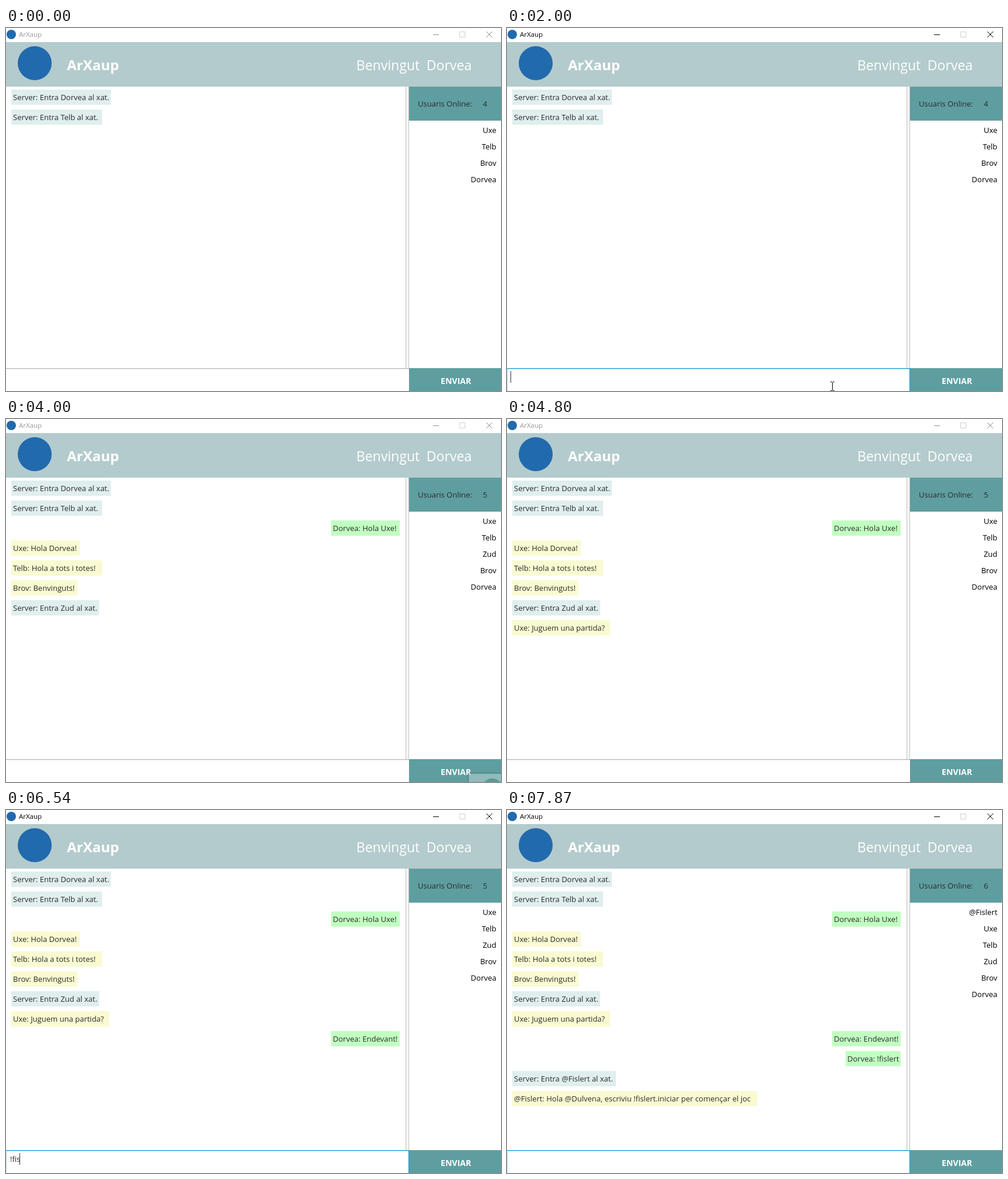
Write an HTML page that moves like this. It is 845x619 px and loops after 8000 ms.

```html
<!DOCTYPE html>
<html lang="ca">
<head>
<meta charset="utf-8">
<style>
html, body { margin: 0; width: 100%; height: 100%; overflow: hidden; background: #fff; }
#stage { position: relative; width: 845px; height: 619px; overflow: hidden; background: #fff;
  font: 13px/26px "Open Sans", "Noto Sans", sans-serif; color: #2b2b2b; white-space: nowrap; }
#stage div, #stage svg { position: absolute; box-sizing: border-box; }
#title { left: 22px; top: 0; font-size: 11.5px; line-height: 22px; color: #999; }
#buttons { left: 720px; top: 0; fill: none; stroke: #8f8f8f; }
.active #title { color: #000; }
.active #buttons { stroke: #000; }
.logo { border-radius: 50%; background: #216aae; }
#header { left: 0; top: 24px; width: 845px; height: 76px; background: #b4cbcd; color: #fff; line-height: 78px; }
#brand { left: 104px; top: 0; font-size: 24px; font-weight: bold; }
#hello { left: 598px; top: 0; font-size: 23px; }
#user { right: 50px; top: 0; font-size: 23px; }
#chat { left: 0; top: 100px; width: 682px; height: 480px; }
#divider { left: 682px; top: 100px; width: 6px; height: 480px; background: #f4f4f4;
  border: solid #c6c6c6; border-width: 0 1px; }
#online { left: 688px; top: 100px; width: 157px; height: 58px; padding-left: 15px; line-height: 58px; background: #5f9ea0; }
#count { left: 126px; top: 0; }
#users { right: 8px; top: 160px; line-height: 28px; text-align: right; white-space: pre; color: #000; }
.msg { height: 26px; padding-left: 3px; }
.server { background: #e0eeee; }
.other { background: #fafad2; }
.own { background: #c1ffc1; }
#field { left: 0; top: 580px; width: 688px; height: 40px; border-top: 1px solid #b9b9b9;
  box-shadow: inset 0 1px 1px #e6e6e6; }
.active #field { border: solid #1a9fd0; border-width: 1px 1px 0 0; box-shadow: inset 1px 1px 0 #a9dcf0; }
#input { left: 7px; top: 585px; height: 20px; line-height: 20px; white-space: pre; }
#caret { left: 100%; top: 0; width: 1px; height: 20px; margin-left: -1px; background: #333; }
#send { left: 688px; top: 580px; width: 157px; height: 39px; background: #5f9ea0; color: #fff;
  font-size: 14px; font-weight: bold; line-height: 43px; text-align: center; padding-left: 3px; }
#beam { left: 551px; top: 603px; fill: none; stroke: #000; }
#toast { left: 790px; top: 605px; width: 90px; height: 60px; background: #b4cbcd; box-shadow: 0 0 4px #0008; }
</style>
</head>
<body>
<div id="stage">
  <div class="logo" style="left:1px;top:3px;width:16px;height:16px"></div>
  <div id="title">ArXaup</div>
  <svg id="buttons" width="125" height="24">
    <path d="M9 11.5H19M100 6L110 16M110 6L100 16"/>
    <path d="M54.5 6.5h9v9h-9z" stroke="#d0d0d0"/>
  </svg>
  <div id="header">
    <div class="logo" style="left:20px;top:7px;width:58px;height:58px"></div>
    <div id="brand">ArXaup</div>
    <div id="hello">Benvingut</div>
    <div id="user">Dorvea</div>
  </div>
  <div id="chat"></div>
  <div id="divider"></div>
  <div id="online">Usuaris Online:<div id="count"></div></div>
  <div id="users"></div>
  <div id="field"></div>
  <div id="input"><span id="text"></span><div id="caret"></div></div>
  <div id="send">ENVIAR</div>
  <svg id="beam" width="9" height="16"><path d="M1 .5H3.5L4.5 1.5L5.5 .5H8M4.5 1V15M1 15.5H3.5L4.5 14.5L5.5 15.5H8"/></svg>
  <div id="toast"><div class="logo" style="left:22px;top:8px;width:36px;height:36px;background:#3ea58b"></div></div>
</div>
<script>
const LOOP = 8000;
const $ = id => document.getElementById(id);
const within = (t, from, to) => t >= from && t < to;

// time, kind, box width, text
const messages = [
  [0, 'server', 170, 'Server: Entra Dorvea al xat.'],
  [0, 'server', 155, 'Server: Entra Telb al xat.'],
  [2170, 'own', 117, 'Dorvea: Hola Uxe!'],
  [2480, 'other', 117, 'Uxe: Hola Dorvea!'],
  [2950, 'other', 155, 'Telb: Hola a tots i totes!'],
  [3260, 'other', 113, 'Brov: Benvinguts!'],
  [4000, 'server', 150, 'Server: Entra Zud al xat.'],
  [4800, 'other', 167, 'Uxe: Juguem una partida?'],
  [6070, 'own', 117, 'Dorvea: Endevant!'],
  [7560, 'own', 94, 'Dorvea: !fislert'],
  [7760, 'server', 177, 'Server: Entra @Fislert al xat.'],
  [7760, 'other', 418, '@Fislert: Hola @Dulvena, escriviu !fislert.iniciar per començar el joc']
].map(([time, kind, width, text], i) => {
  const el = document.createElement('div');
  el.className = 'msg ' + kind;
  el.textContent = text;
  el.style.cssText = `left:${kind === 'own' ? 672 - width : 9}px;top:${5 + 34 * i}px;width:${width}px`;
  $('chat').append(el);
  return { time, el };
});

const users = [[7760, '@Fislert'], [0, 'Uxe'], [0, 'Telb'], [4000, 'Zud'], [0, 'Brov'], [0, 'Dorvea']];

// Each run types its parts at even steps between two times, after the text before it.
const runs = [
  [368, 1160, '', [...'Hola U']],
  [1310, 1700, 'Hola U', [...'xe!']],
  [2000, 2000, '', ['']],
  [5490, 5790, '', ['En', 'de', 'van', 't!']],
  [5920, 5920, '', ['']],
  [6200, 6460, '', [...'!fi']],
  [6540, 6930, '!fi', [...'slert']],
  [7390, 7390, '', ['']]
];

function typedAt(t) {
  const run = runs.filter(r => r[0] <= t).pop();
  if (!run) return '';
  const [from, to, before, parts] = run;
  const step = (to - from) / (parts.length - 1) || 1;
  return before + parts.slice(0, Math.floor((t - from) / step + 1e-6) + 1).join('');
}

function draw(t) {
  const active = within(t, 210, 2320) || within(t, 5110, 7660) || t >= 7870;
  const online = users.filter(u => u[0] <= t).map(u => u[1]);
  $('stage').className = active ? 'active' : '';
  $('text').textContent = typedAt(t);
  $('caret').hidden = !active || within(t, 5110, 5180) || t >= 7870;
  $('count').textContent = online.length;
  $('users').textContent = online.join('\n');
  messages.forEach(m => m.el.hidden = t < m.time);
  $('beam').style.display = within(t, 2000, 2320) ? '' : 'none';
  $('toast').hidden = !within(t, 4000, 4800);
  $('toast').style.opacity = t < 4250 ? 0.6 : 1;
}

const start = performance.now();
function frame() {
  draw((performance.now() - start) % LOOP);
  requestAnimationFrame(frame);
}
frame();
</script>
</body>
</html>
```
